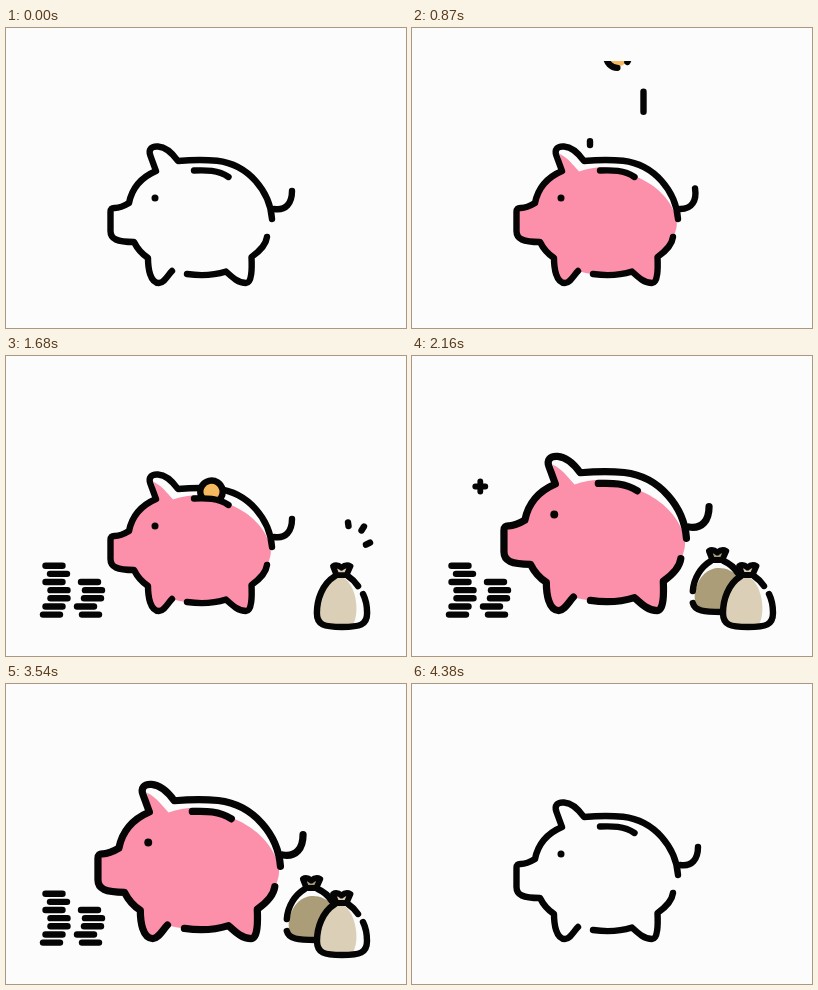
Write an HTML page with a canvas that moves like this. It is 400 by 300 pixels and loops after 5070 ms.

```html
<!DOCTYPE html>
<html lang="en">
<head>
<meta charset="utf-8">
<title>Piggy bank</title>
<style>
html, body { margin: 0; width: 100%; height: 100%; overflow: hidden; background: #fcfcfc; }
canvas { display: block; }
</style>
</head>
<body>
<canvas id="stage" width="400" height="300"></canvas>
<script>
const ctx = document.getElementById('stage').getContext('2d');
const LOOP = 5070, INK = '#050505', PAPER = '#fcfcfc';
const path = d => new Path2D(d);

const pig = {
  body: path('M266 191C264 164 243 136.500 211 132.800Q194 131 172 133C167 126 160 119 152 118.500C145 118 142 122 144.500 128L150 143C136 149 126 160 123 175C118 178 114 180 109 180Q104.500 179.500 104.500 184V203C104.500 211 111 214 128 214Q133 224 142 230C142 240 144 255 153 255C158 255 162 247 166 243M181 246C195 248 209 247 220 243.500C226 249 232 255 240 255C246 255 246 240 245.500 229C254 223 260 217 261 209'),
  fill: path('M148 126C156 130 161 137 167 143.500C183 138 205 136 225 149C246 158 260 173 264.500 191Q266 200 261 209C260 217 254 223 246 229C246 240 246 255 240 255C232 255 226 249 220 243.500C209 247 180 248 166 243C162 247 158 255 153 255C144 255 142 240 142 230Q133 224 128 214C111 214 104.500 211 104.500 203V184Q104.500 180 109 180C114 180 118 178 123 175C126 160 136 149 150 143Z'),
  slot: path('M188 142.500C200 142 212 142 222.500 149'),
  tail: path('M268 181C280 183 286 175 286 163')
};
const crown = path('M330.500 219L327 210Q331 207.500 335.500 211.500Q340 207.500 344.500 210L340.500 219Z');
const frontBag = {
  shape: path('M329 220C316 228 311 244 311 257C311 269 318 271 336 271C354 271 361 269 361 257C361 243 354 227 342 220Z'),
  fill: path('M329 220C316 228 311 244 311 257C311 269 318 271 336 271H345C354 262 352 230 337 221Z'),
  line: path('M329 220C316 228 311 244 311 257C311 269 318 271 336 271C354 271 361 269 361 257Q361 246 357 238M342 220Q348 224 352 230'),
  color: '#dbd0b7'
};
const backBag = {
  shape: path('M329 220C316 228 311 244 311 257C311 269 318 271 336 271H361V257C361 243 354 227 342 220Z'),
  fill: path('M313 252C319 222 344 222 357 236V271H330C316 271 312 266 313 252Z'),
  line: path('M329 220C319 226 312 237 311 250M311 262C313 270 322 271 340 271M342 220Q351 224 356 232'),
  color: '#ab9d78'
};
const leftStack = [45.5, 48, 53, 53, 48, 52.5, 48];
const rightStack = [84.5, 79.5, 86.5, 87.5, 83.5];
// x, first y, last y, start time
const streaks = [[231.5, 55, 92, 750], [178, 81, 117, 647], [175, 54, 90, 1230], [226.5, 73, 110, 1230], [245.5, 49, 86, 1122]];
const pluses = [[68.3, 130.5, 2070], [230, 33, 2220], [343, 120, 2300], [52, 90, 2380]];

const ramp = (t, a, b) => Math.min(1, Math.max(0, (t - a) / (b - a)));
const smooth = u => u * u * (3 - 2 * u);
const bump = (t, a, b) => Math.sin(Math.PI * ramp(t, a, b));
const backOut = u => 1 + 2.2 * (u - 1) ** 3 + 1.2 * (u - 1) ** 2;
const radians = degrees => degrees * Math.PI / 180;

function group(draw) {
  ctx.save();
  draw();
  ctx.restore();
}

function scaleAt(x, y, sx, sy = sx) {
  ctx.translate(x, y);
  ctx.scale(sx, sy);
  ctx.translate(-x, -y);
}

function fill(shape, color) {
  ctx.fillStyle = color;
  ctx.fill(shape);
}

function circle(x, y, r, color) {
  ctx.beginPath();
  ctx.arc(x, y, r, 0, 7);
  ctx.fillStyle = color;
  ctx.fill();
}

function line(x1, y1, x2, y2) {
  ctx.beginPath();
  ctx.moveTo(x1, y1);
  ctx.lineTo(x2, y2);
  ctx.stroke();
}

function drawCoin(t, start) {
  const y = 28 + 0.63 * (t - start);
  if (y < 10 || y > 160) return;
  group(() => {
    ctx.beginPath();
    ctx.rect(0, 33, 400, 111);
    ctx.clip();
    ctx.translate(205.5, y);
    ctx.rotate(radians(60 - 0.85 * (t - 870)));
    circle(0, 0, 10, '#f6b95f');
    ctx.beginPath();
    ctx.arc(0, 0, 11.2, 0.55, 2 * Math.PI - 0.55);
    ctx.stroke();
  });
}

function drawPig(t) {
  const grow = 0.13 * smooth(ramp(t, 1780, 2120)) + 0.064 * smooth(ramp(t, 3540, 3710))
    - 0.194 * smooth(ramp(t, 3710, 4040));
  const pink = backOut(ramp(t, 60, 570)) * (1 - ramp(t, 4050, 4380) ** 2);
  const wag = t > 590 && t < 1110 ? -18 * Math.sin((t - 590) / 130 * Math.PI) : 0;
  group(() => {
    scaleAt(201, 258, 1 + grow);
    if (t > 60 && pink > 0) group(() => {
      scaleAt(186, 256, pink);
      fill(pig.fill, '#fc8fa9');
    });
    ctx.stroke(pig.body);
    for (const start of [870, 1190, 1510]) drawCoin(t, start);
    ctx.stroke(pig.slot);
    circle(149, 170, 3.5, INK);
    ctx.translate(268, 181);
    ctx.rotate(radians(wag));
    ctx.translate(-268, -181);
    ctx.stroke(pig.tail);
  });
}

function drawStack(rows, t) {
  const grow = smooth(ramp(t, 1150, 1300));
  const hop = bump(t, 1230, 1470);
  if (!grow) return;
  rows.forEach((x, i) => {
    const y = 258.6 - 8.15 * i * grow - hop * (8 + 0.2 * i * i);
    line(x - 8.5 * grow, y, x + 8.5 * grow, y);
  });
}

function drawBag(bag, dx, dy, t, start) {
  const size = smooth(ramp(t, start, start + 130));
  const squash = bump(t, start + 180, start + 320);
  if (!size) return;
  group(() => {
    ctx.translate(dx, dy - 10 * bump(t, start + 40, start + 180));
    scaleAt(336, 272, size * (1 + 0.2 * squash), size * (1 - 0.12 * squash));
    fill(bag.shape, PAPER);
    fill(bag.fill, bag.color);
    ctx.stroke(bag.line);
    fill(crown, bag.color);
    ctx.lineWidth = 5.8;
    ctx.stroke(crown);
  });
}

function drawSparks(t, start, marks) {
  const out = ramp(t, start, start + 60), gone = ramp(t, start + 100, start + 180);
  if (out === 0 || gone === 1) return;
  for (const [x, y, dx, dy] of marks)
    line(x + dx * gone, y + dy * gone, x + dx * out, y + dy * out);
}

function drawStreak([x, from, to, start], t) {
  const u = ramp(t, start, start + 240), span = to - from;
  if (u > 0 && u < 1)
    line(x, from + span * ramp(u, 0.35, 1), x, from + span * ramp(u, 0, 0.65));
}

function drawPlus([x, y, start], t) {
  const size = ramp(t, start, start + 80) * (1 - ramp(t, start + 180, start + 280));
  if (!size) return;
  const arm = 5 * size;
  ctx.lineWidth = 5.8 * size;
  line(x - arm, y, x + arm, y);
  line(x, y - arm, x, y + arm);
}

function draw(t) {
  ctx.fillStyle = PAPER;
  ctx.fillRect(0, 0, 400, 300);
  ctx.strokeStyle = INK;
  ctx.lineWidth = 6.4;
  ctx.lineCap = ctx.lineJoin = 'round';
  const leave = 1 - ramp(t, 3720, 4380) ** 2;
  if (leave > 0) {
    group(() => {
      scaleAt(67, 259, leave);
      drawStack(leftStack, t);
      drawStack(rightStack, t);
    });
    group(() => {
      scaleAt(320, 266, leave);
      drawBag(backBag, -30.2, -15, t, 1830);
      drawBag(frontBag, 0, 0, t, 1500);
    });
  }
  drawPig(t);
  for (const s of streaks) drawStreak(s, t);
  drawSparks(t, 1260, [[48, 176, -1.5, -4], [64, 177, 1, -4], [77, 186, 3.5, -3.5]]);
  drawSparks(t, 1590, [[342.5, 170, -0.5, -3.5], [355.5, 174.5, 2.5, -4], [360, 188.7, 4, -2]]);
  for (const p of pluses) drawPlus(p, t);
}

function frame() {
  draw(performance.now() % LOOP);
  requestAnimationFrame(frame);
}
frame();
</script>
</body>
</html>
```
